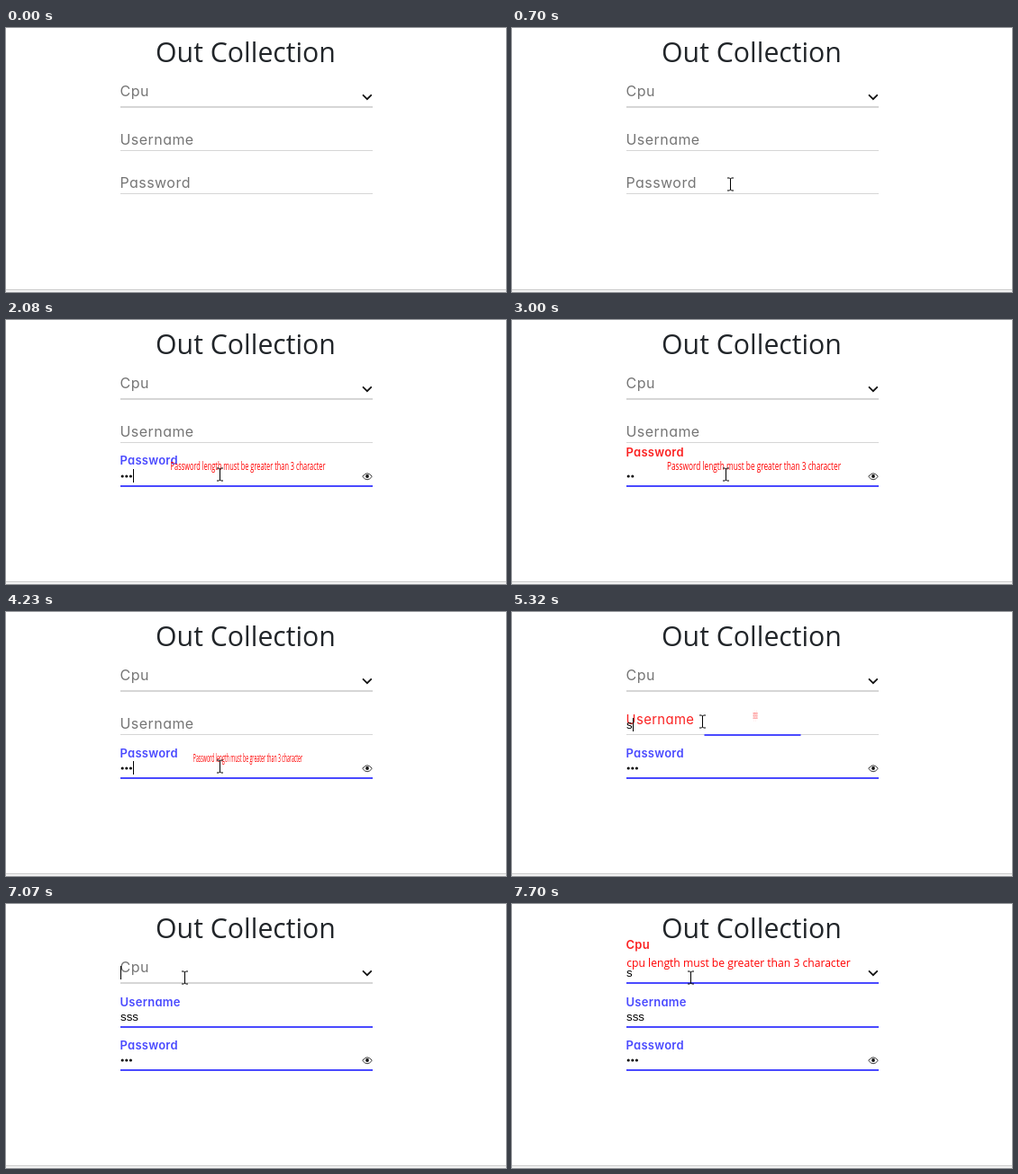
An HTML page for the animation above (8 s loop, 555 by 294 pixels).

```html
<!DOCTYPE html>
<html lang="en">
<head>
<meta charset="utf-8">
<title>Form validation</title>
<style>
  html, body { margin: 0; width: 100%; height: 100%; overflow: hidden; background: #fff; }
  svg { display: block; width: 555px; height: 294px; }
  .title { font: 30.25px "Open Sans", "Noto Sans", sans-serif; fill: #212529; text-anchor: middle; }
  .label { font-family: Inter, sans-serif; font-feature-settings: "cv11"; }
  .error { font: 12.13px "Open Sans", "Noto Sans", sans-serif; fill: #f00; text-anchor: middle; }
  .value { font: 13.33px "Liberation Sans", Arial, sans-serif; fill: #000; }
</style>
</head>
<body>
<svg id="stage" viewBox="0 0 555 294">
  <rect width="555" height="294" fill="#fff"/>
  <rect y="292" width="555" height="2" fill="#f3f3f3"/>
  <rect y="291" width="555" height="1" fill="#cbcbcb"/>
  <text class="title" x="266" y="38">Out Collection</text>
  <g id="form"></g>
  <path d="M396 74.3l4.9 4.9 4.9-4.9" fill="none" stroke="#111" stroke-width="1.7"/>
  <g id="eye" fill="none" stroke="#222" stroke-width=".9">
    <path d="M395.7 174.3q5.3-7 10.6 0q-5.3 7-10.6 0z"/>
    <circle cx="401" cy="174" r="1.9" fill="#111" stroke="none"/>
  </g>
  <rect id="caret" width="1" height="15" fill="#000"/>
  <g id="pointer" fill="none">
    <path d="M-3.5-7.5h2.5l1 1 1-1h2.5M0-6.5v12M-3.5 6.5h2.5l1-1 1 1h2.5" stroke="#000"/>
  </g>
</svg>
<script>
const LOOP = 8000, LEFT = 127, RIGHT = 407, BLINK = 530;
const BLUE = '#4a4aff', RED = '#fb2222', GRAY = '#757575';

// keys: [time, characters]; toggles: times at which the error shows or hides, in turn
const fields = [
  { name: 'Cpu', y: 76, lineY: 87, lineH: 2, valueY: 81, errorX: 251.5, errorY: 70,
    keys: [[7095, 1]], toggles: [7160] },
  { name: 'Username', y: 130, lineY: 136, lineH: 1, valueY: 130, errorX: 270, errorY: 119,
    keys: [[5240, 1], [6050, 2], [6110, 3]], toggles: [5305, 6110] },
  { name: 'Password', y: 178, lineY: 184, lineH: 1, valueY: 178, errorX: 268.5, errorY: 167, secret: true,
    keys: [[845, 1], [1580, 2], [1960, 3], [2800, 2], [3520, 1], [3830, 2], [4066, 3]],
    toggles: [910, 1960, 2800, 4066] }
];
const [cpu, username, password] = fields;

// [field, times at which the caret starts its blink anew]
const carets = [
  [password, [780, 845, 1580, 1960, 3520, 3830, 4066]],
  [username, [5070, 5240, 6050, 6110]],
  [cpu, [6920, 7095, 7160]]
];
// [time, x, y]
const path = [[70, 380, 227], [780, 237, 172], [4650, 237, 172], [4830, 234, 151],
  [4900, 211, 122], [6600, 211, 122], [6840, 198, 82]];

const byId = id => document.getElementById(id);
const clamp = v => Math.max(0, Math.min(1, v));
const smooth = v => v * v * (3 - 2 * v);
const last = (list, test) => list.filter(test).pop();

function set(el, attrs) {
  for (const key in attrs) el.setAttribute(key, attrs[key]);
}
function add(tag, attrs, text = '') {
  const el = document.createElementNS('http://www.w3.org/2000/svg', tag);
  set(el, attrs);
  el.textContent = text;
  return byId('form').appendChild(el);
}

// The CSS "ease" curve: cubic-bezier(.25, .1, .25, 1)
function ease(x) {
  x = clamp(x);
  const bezier = (a, b, u) => 3 * a * u * (1 - u) ** 2 + 3 * b * u * u * (1 - u) + u ** 3;
  let lo = 0, hi = 1;
  for (let i = 0; i < 24; i++) {
    const mid = (lo + hi) / 2;
    if (bezier(.25, .25, mid) < x) lo = mid; else hi = mid;
  }
  return bezier(.1, 1, lo);
}

for (const f of fields) {
  add('rect', { x: LEFT, y: f.lineY, width: RIGHT - LEFT, height: f.lineH, fill: '#d6d6d6' });
  f.line = add('rect', { y: f.lineY, height: 2, fill: BLUE });
  f.label = add('text', { class: 'label', x: LEFT - .5 }, f.name);
  if (f.secret) {
    f.dots = [0, 1, 2].map(i => add('circle', { cx: 129.2 + i * 4.6, cy: 174, r: 1.55, fill: '#000' }));
  } else {
    f.value = add('text', { class: 'value', x: LEFT, y: f.valueY });
  }
  const subject = f === cpu ? 'cpu' : f.name;
  f.error = add('text', { class: 'error' }, subject + ' length must be greater than 3 character');
}

function typed(f, t) {
  const key = last(f.keys, k => k[0] <= t);
  return key ? key[1] : 0;
}

function drawField(f, t) {
  const count = typed(f, t);
  const since = t - f.keys[0][0];
  const float = ease(since / 400);
  const grow = ease(since / 340);

  const passed = f.toggles.filter(time => time <= t);
  const age = passed.length ? t - passed[passed.length - 1] : 0;
  const shown = passed.length % 2 === 1;
  const toward = v => shown ? v : passed.length ? 1 - v : 0;
  const scale = toward(ease(age / 500));
  const lift = toward(smooth(clamp(age / 150)));

  const half = (RIGHT - LEFT) / 2 * grow;
  set(f.line, { x: (LEFT + RIGHT) / 2 - half, width: half * 2 });
  set(f.label, {
    y: f.y - 16 * float - 10 * lift,
    'font-size': 16 - 3 * grow,
    'font-weight': grow > .6 ? 600 : 400,
    'letter-spacing': .45 - .2 * grow,
    fill: !count ? GRAY : count < 3 ? RED : BLUE
  });
  set(f.error, {
    transform: `translate(${f.errorX} ${f.errorY}) scale(${Math.max(scale, .0001)} 1)`,
    visibility: scale > .002 ? 'visible' : 'hidden'
  });
  if (f.secret) f.dots.forEach((dot, i) => set(dot, { visibility: i < count ? 'visible' : 'hidden' }));
  else f.value.textContent = 's'.repeat(count);
}

function drawCaret(t) {
  const active = last(carets, c => c[1][0] <= t);
  const on = active && (t - last(active[1], time => time <= t)) % (2 * BLINK) < BLINK;
  set(byId('caret'), { visibility: on ? 'visible' : 'hidden' });
  if (!on) return;
  const f = active[0];
  const step = f.secret ? 4.6 : 6.67;
  set(byId('caret'), { x: Math.round(LEFT + .4 + typed(f, t) * step), y: f.valueY - 12 });
}

function drawPointer(t) {
  const i = path.findIndex(p => p[0] > t);
  const b = i < 0 ? path[path.length - 1] : path[i];
  const a = i > 0 ? path[i - 1] : b;
  const k = a === b ? 0 : smooth((t - a[0]) / (b[0] - a[0]));
  const at = n => a[n] + (b[n] - a[n]) * k;
  set(byId('pointer'), {
    transform: `translate(${Math.round(at(1)) + .5} ${Math.round(at(2)) + .5})`,
    visibility: t < path[0][0] ? 'hidden' : 'visible'
  });
}

function draw(t) {
  fields.forEach(f => drawField(f, t));
  set(byId('eye'), { visibility: typed(password, t) ? 'visible' : 'hidden' });
  drawCaret(t);
  drawPointer(t);
}

const start = performance.now();
function tick() {
  draw((performance.now() - start) % LOOP);
  requestAnimationFrame(tick);
}
tick();
</script>
</body>
</html>
```
